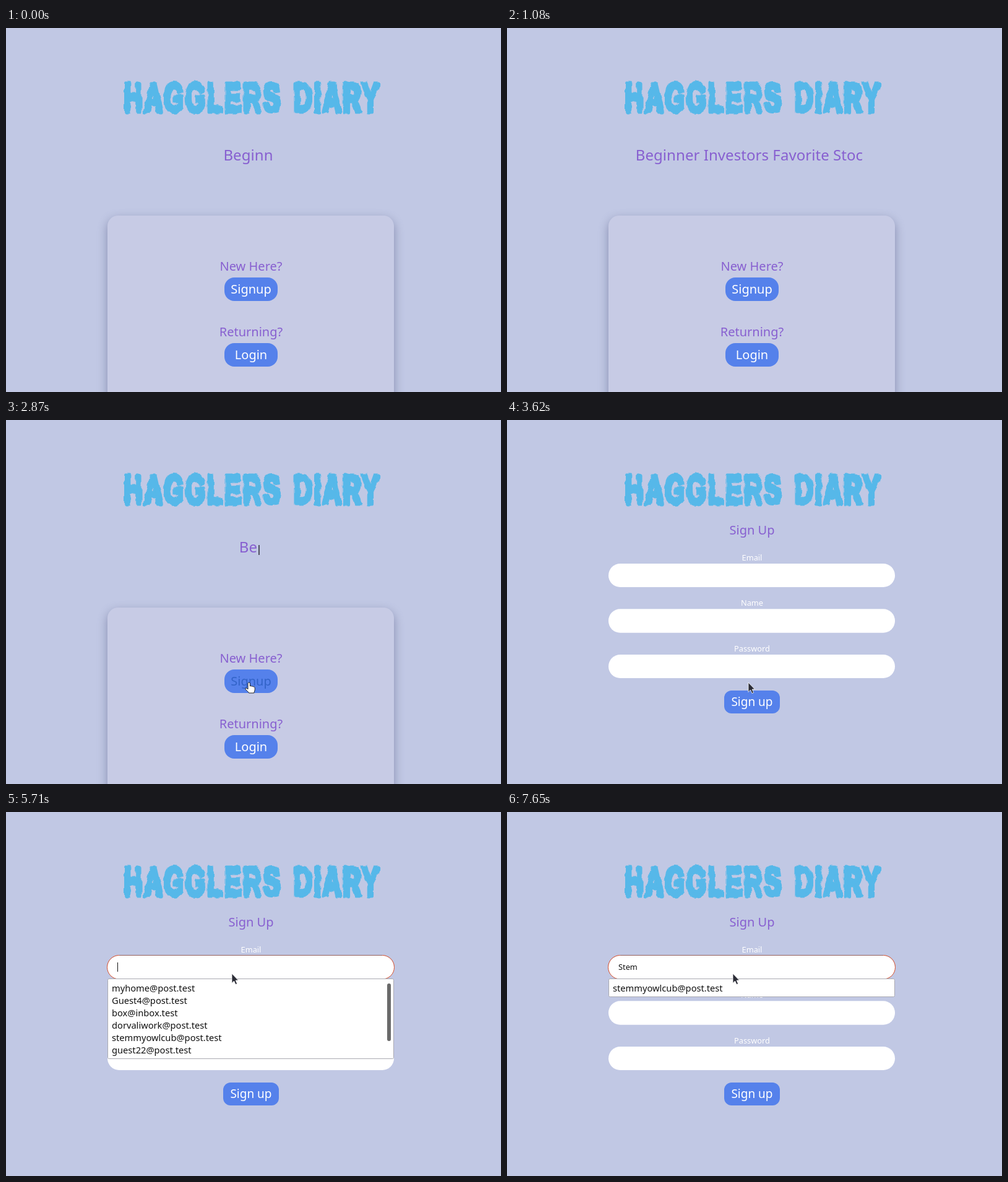
Animation, 800 px wide and 588 px high, one loop 8 s. Source, as an HTML page:

```html
<!DOCTYPE html>
<html lang="en">
<head>
<meta charset="utf-8">
<title>Sign up</title>
<style>
  html, body { margin: 0; width: 100%; height: 100%; overflow: hidden; background: #c1c8e4; }
  svg { display: block; font: 20px "Noto Sans", "Open Sans", sans-serif; }
  text { text-anchor: middle; white-space: pre; fill: #fff; }
  .purple { fill: #875fd0; }
  .button { fill: #5581eb; }
  .small { font-size: 12.8px; }
  .left { text-anchor: start; }
  .dark { fill: #111; }
  .field { fill: #fff; }
  #headline { font: bold 64px "Liberation Sans", Arial, sans-serif; letter-spacing: 4.5px; word-spacing: 8px;
    fill: #56b8e9; stroke: #56b8e9; stroke-width: 7px; stroke-linejoin: round; }
  #tagline { font-size: 24px; letter-spacing: .06px; }
  #card { fill: #c7cbe5; filter: drop-shadow(0 6px 8px rgba(60, 65, 110, .45)); }
  #menu { font-size: 14.67px; }
</style>
</head>
<body>
<svg width="800" height="588" viewBox="0 0 800 588">
  <defs>
    <filter id="drip" x="-5%" y="-20%" width="110%" height="140%" color-interpolation-filters="sRGB">
      <feTurbulence type="fractalNoise" baseFrequency=".13 .09" numOctaves="1" seed="4"/>
      <feDisplacementMap in="SourceGraphic" scale="7" xChannelSelector="R" yChannelSelector="G"/>
    </filter>
  </defs>

  <g filter="url(#drip)">
    <text id="headline" transform="translate(398 134.5) scale(.64 1)">HAGGLERS DIARY</text>
  </g>

  <g id="home">
    <text id="tagline" class="purple left" y="213.5"></text>
    <rect id="bar" y="202" width="1.6" height="16" fill="#33333c"/>
    <rect id="card" x="164" y="303" width="463" height="340" rx="17"/>
    <text class="purple" x="396" y="392">New Here?</text>
    <rect class="button" x="353" y="403" width="86" height="38" rx="16"/>
    <text id="signup" x="396" y="429">Signup</text>
    <text class="purple" x="396" y="498">Returning?</text>
    <rect class="button" x="353" y="509" width="86" height="38" rx="16"/>
    <text x="396" y="535">Login</text>
  </g>

  <g id="form">
    <text class="purple" x="396" y="185">Sign Up</text>
    <text class="small" x="396" y="227">Email</text>
    <rect class="field" x="164" y="232" width="463" height="38" rx="19"/>
    <text class="small" x="396" y="300">Name</text>
    <rect class="field" x="164" y="305.3" width="463" height="38.4" rx="19"/>
    <text class="small" x="396" y="374">Password</text>
    <rect class="field" x="164" y="379" width="463" height="38" rx="19"/>
    <rect class="button" x="351" y="437" width="90" height="37" rx="12"/>
    <text x="396" y="462" font-size="19">Sign up</text>

    <g id="focus">
      <rect x="163.5" y="231.5" width="464" height="38.5" rx="19.2" fill="none" stroke="#dd5630"/>
      <path d="M183 231.5H608" stroke="#94605c"/>
      <text id="typed" class="small left dark" x="180" y="255"></text>
      <rect id="caret" y="243" width="1" height="15" fill="#111"/>
    </g>

    <g id="menu">
      <rect id="panel" x="164.5" y="269.5" width="462" rx="2" fill="#fff" stroke="#aaaab2"/>
      <g id="rows"></g>
      <rect id="thumb" x="616" y="277" width="6" height="93" rx="3" fill="#6a6a6a"/>
    </g>
  </g>

  <g id="pointer">
    <path id="arrow" d="M0 0V15.5L3.5 12 6 17.6 8.6 16.5 6.2 11H10.5Z" fill="#2b2c36" stroke="#fff" stroke-width=".8"/>
    <path id="hand" d="M-1 10V1.7a1.7 1.7 0 0 1 3.4 0V6c1-.8 2.5-.6 2.9.4 1-.6 2.3-.3 2.6.7 1.2-.4 2.3.3 2.3 1.5v3c0 2-1.2 3-1.4 5.4H.5c0-2-5-4.5-5.5-6.5-.3-1.6 1.8-2 4 .5Z" fill="#fff" stroke="#222"/>
    <path id="beam" d="M-3-9Q0-9 0-7Q0-9 3-9M0-7V7M-3 9Q0 9 0 7Q0 9 3 9" fill="none" stroke="#222"/>
  </g>
</svg>

<script>
const LOOP = 8000, CENTER = 395.5, BAR_BOX = 8;
const TAGLINE = "Beginner Investors Favorite Stock Market Resource";
const ENTRY = "Stem";
const MATCH = "stemmyowlcub@post.test";
const EMAILS = ["myhome@post.test", "Guest4@post.test", "box@inbox.test",
  "dorvaliwork@post.test", MATCH, "guest22@post.test"];
const KEY_TIMES = [6170, 6440, 6790, 7320];

// Each key is [time, ...values]
const LETTERS = [[0, 6], [870, 28], [1080, 32], [1700, 46], [1840, 49], [2310, 49],
  [2780, 0], [2870, 2], [3360, 14]];
const MOUSE = [[1770, 516, 561], [2050, 455, 486], [2310, 455, 486], [2720, 392, 424],
  [3140, 392, 424], [3360, 390, 424], [4150, 390, 424], [4560, 379, 302],
  [4700, 379, 302], [5040, 365, 261]];

const $ = id => document.getElementById(id);
const show = (id, on) => $(id).style.display = on ? "" : "none";

function track(keys, t) {
  const i = keys.findIndex(k => k[0] > t);
  if (i < 0) return keys.at(-1).slice(1);
  if (i === 0) return keys[0].slice(1);
  const [a, b] = [keys[i - 1], keys[i]];
  const k = (t - a[0]) / (b[0] - a[0]);
  return a.slice(1).map((v, j) => v + (b[j + 1] - v) * k);
}

function drawTagline(t) {
  const line = $("tagline");
  const count = Math.floor(track(LETTERS, t)[0] + .01);
  line.textContent = TAGLINE.slice(0, count);
  const width = line.getComputedTextLength();
  const x = CENTER - (width + BAR_BOX) / 2;
  line.setAttribute("x", x);
  $("bar").setAttribute("x", x + width + 2);
  const phase = t % 1000;
  show("bar", phase >= 450 && phase < 980);
}

function drawEntry(t) {
  const typed = $("typed");
  typed.textContent = ENTRY.slice(0, KEY_TIMES.filter(k => t >= k).length);
  $("caret").setAttribute("x", 180 + Math.round(typed.getComputedTextLength()));
  show("focus", t >= 5240);
  show("caret", t < 7650);
}

function drawMenu(t) {
  const filtered = t >= KEY_TIMES[0];
  const list = filtered ? [MATCH] : EMAILS;
  show("menu", t >= 5640);
  show("thumb", !filtered);
  $("panel").setAttribute("height", filtered ? 29 : 129);
  $("rows").innerHTML = list.map((mail, i) =>
    `<text class="left dark" x="171" y="${290 + 20 * i}">${mail}</text>`).join("");
}

function drawPointer(t) {
  const [x, y] = track(MOUSE, t);
  const overButton = t < 3620 && x > 353 && x < 439 && y > 403 && y < 441;
  const overField = t >= 3620 && t < 5640 &&
    [232, 305, 379].some(top => y > top && y < top + 38);
  show("pointer", t >= 1770);
  $("pointer").setAttribute("transform", `translate(${x} ${y})`);
  show("hand", overButton);
  show("beam", overField);
  show("arrow", !overButton && !overField);
  $("signup").style.fill = overButton ? "#3263c8" : "#fff";
}

const start = performance.now();
function frame() {
  const t = (performance.now() - start) % LOOP;
  show("home", t < 3550);
  show("form", t >= 3550);
  drawTagline(t);
  drawEntry(t);
  drawMenu(t);
  drawPointer(t);
  requestAnimationFrame(frame);
}
frame();
</script>
</body>
</html>
```
